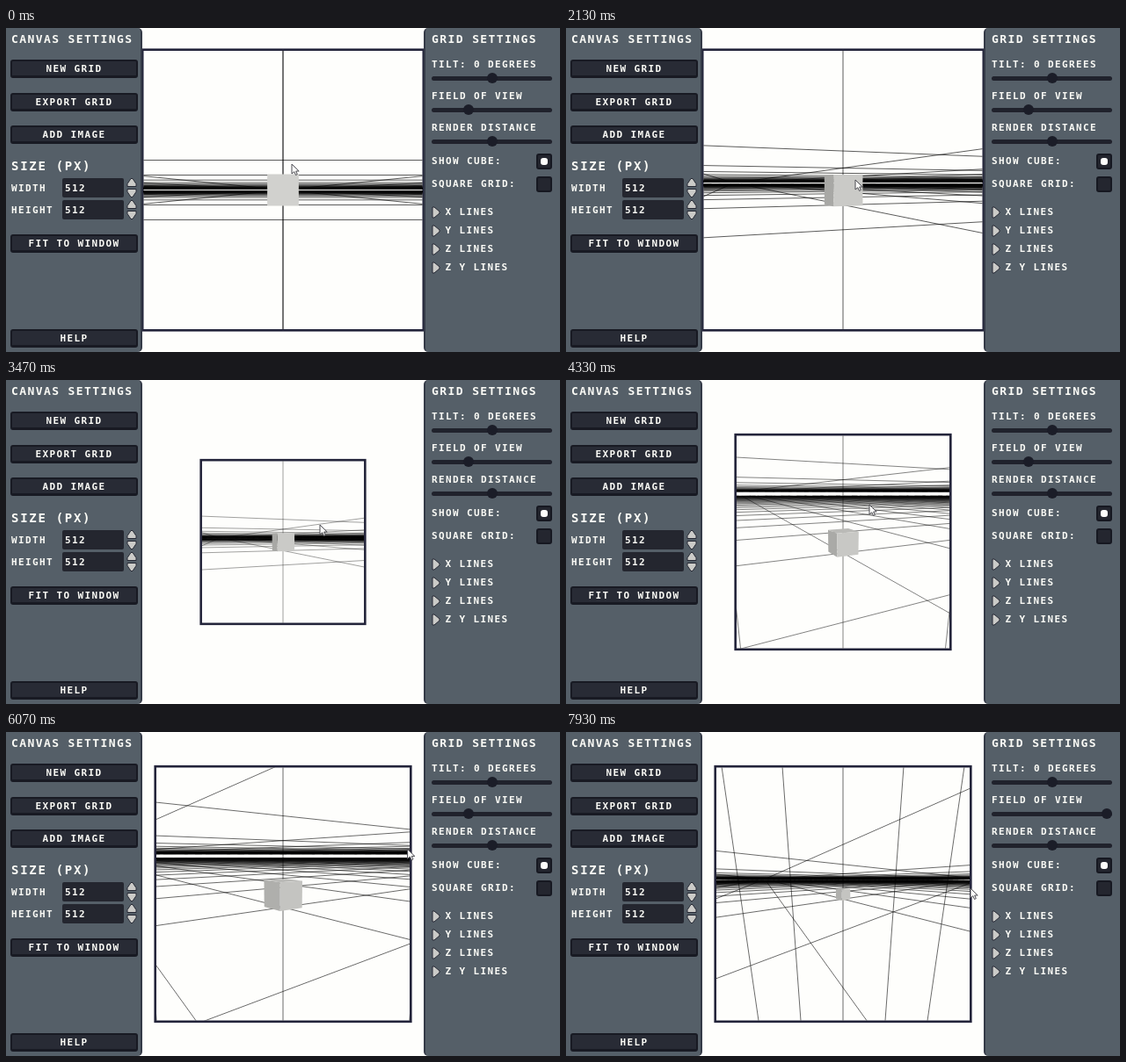
These frames come from a looping animation (630x369 px, 8000 ms). An HTML page with a canvas:

```html
<!DOCTYPE html>
<html lang="en">
<head>
<meta charset="utf-8">
<title>Grid settings</title>
<style>
  html, body { margin: 0; width: 100%; height: 100%; overflow: hidden; background: #fefefc; }
  #stage { position: relative; width: 630px; height: 369px; overflow: hidden; }
  #stage * { position: absolute; box-sizing: border-box; }
  .panel { top: 0; width: 155px; height: 369px; background: #555f68; border: 0 solid #343a47; }
  .left { left: 0; border-right-width: 2px; border-radius: 0 5px 5px 0; }
  .right { left: 475px; border-left-width: 2px; border-radius: 5px 0 0 5px; }
  .text { font: bold 11px/20px "DejaVu Sans Mono", monospace; letter-spacing: 1.38px; color: #fbfbf6; white-space: pre; }
  .head { font-size: 13px; letter-spacing: 1.4px; }
  .title { font-size: 14px; letter-spacing: 1.7px; }
  .button { left: 5px; width: 145px; height: 21px; background: #282b35; border: solid #181a23; border-width: 2px 2px 3px;
            border-radius: 3px; line-height: 17px; text-align: center; }
  .field { left: 64px; width: 70px; height: 22px; background: #24262f; border-radius: 2px; padding-left: 3px; line-height: 23px; }
  .track { left: 484px; width: 137px; height: 5px; background: #20222c; border-radius: 3px; }
  .thumb { width: 12px; height: 12px; margin: -6px; background: #1b1d28; border-radius: 50%; }
  .box { left: 603px; width: 18px; height: 18px; background: #24262f; border: 2px solid #161821; border-radius: 3px; }
  .dot { left: 608px; width: 8px; height: 8px; background: #fefefc; border-radius: 3px; }
  svg { left: 0; top: 0; }
</style>
</head>
<body>
<div id="stage">
  <canvas id="view" width="630" height="369"></canvas>
  <div class="panel left"></div>
  <div class="panel right"></div>
</div>
<script>
const stage = document.getElementById('stage');
const ctx = document.getElementById('view').getContext('2d');

function add(className, x, y, text = '') {
  const el = document.createElement('div');
  el.className = className;
  if (x !== null) el.style.left = x + 'px';
  el.style.top = y + 'px';
  el.textContent = text;
  stage.append(el);
  return el;
}
const label = (text, x, middle, kind = '') => add('text ' + kind, x, middle - 10, text);

label('CANVAS SETTINGS', 6, 13, 'head');
label('SIZE (PX)', 6, 157, 'title');
label('GRID SETTINGS', 484, 13, 'head');
['NEW GRID', 'EXPORT GRID', 'ADD IMAGE'].forEach((text, i) => add('text button', null, 36 + 37.5 * i, text));
add('text button', null, 234.5, 'FIT TO WINDOW');
add('text button', null, 342.5, 'HELP');
['WIDTH', 'HEIGHT'].forEach((text, i) => {
  label(text, 6, 182.5 + 25 * i);
  add('text field', null, 171 + 25 * i, '512');
});
const SLIDER_X = 526;
const thumbs = [['TILT: 0 DEGREES', 552.5], ['FIELD OF VIEW', SLIDER_X], ['RENDER DISTANCE', 552.5]]
  .map(([text, x], i) => {
    const y = 57 + 36 * i;
    label(text, 484, y - 15);
    add('track', null, y - 2.5);
    return add('thumb', x, y);
  });
['SHOW CUBE:', 'SQUARE GRID:'].forEach((text, i) => {
  label(text, 484, 152 + 26 * i);
  add('box', null, 143 + 26 * i);
});
add('dot', null, 148);

const rows = ['X LINES', 'Y LINES', 'Z LINES', 'Z Y LINES'].map((text, i) => {
  label(text, 499.5, 210 + 21 * i);
  return `M485 ${204 + 21 * i}v12h2l6-5v-2l-6-5z`;
});
const spins = [171, 196].map(y => `M138 ${y + 9.5}v-3l4-6h2l4 6v3zM138 ${y + 12.5}v3l4 6h2l4-6v-3z`);
stage.insertAdjacentHTML('beforeend', `
  <svg width="630" height="369">
    <path d="${rows.join('') + spins.join('')}" fill="#cbcbc8" stroke="#262934" stroke-linejoin="round"/>
    <path id="cursor" d="M0 0V11L2.8 8.7L4.5 12.5L6.3 11.6L4.7 8H8.2Z" fill="#fefefc" stroke="#4a4a50"/>
  </svg>`);
const cursor = document.getElementById('cursor');

// Progress from 0 to 1 between two times, straight or eased.
const ramp = (t, from, to) => Math.min(1, Math.max(0, (t - from) / (to - from)));
const ease = (t, from, to) => { const k = ramp(t, from, to); return k * k * (3 - 2 * k); };
const mix = (a, b, k) => a + (b - a) * k;

const yawAt = t => 10 * ramp(t, 1133, 1733) + 10 * ramp(t, 2000, 2133) + 17 * ease(t, 3467, 5933);
const pitchAt = t => 1.35 * ramp(t, 1133, 2133) + 11 * ease(t, 3467, 4333) - 4.1 * ramp(t, 5200, 5933);
const sizeAt = t => 317 - 133 * ramp(t, 2600, 3467) + 104 * ease(t, 3467, 5075);
const focalAt = t => 1.072 + 0.073 * ramp(t, 6400, 6867) - 0.739 * ramp(t, 6867, 7533);
const sliderAt = t => SLIDER_X + 89 * ramp(t, 6400, 7533) ** 1.5;

// Pointer stops as arrival time and place; each trip takes at most 600 ms.
const stops = [[0, 325, 155], [1000, 277, 185], [1733, 357, 166], [1933, 307, 164], [2133, 329, 173],
  [2533, 357, 165], [4133, 345, 142], [5400, 395, 203], [5933, 360, 203], [6200, 553, 64],
  [6333, 526, 92], [7933, 371, 178]];

function cursorAt(t) {
  let [last, x, y] = stops[0];
  for (const [arrival, toX, toY] of stops.slice(1)) {
    const k = ramp(t, Math.max(last, arrival - 600), arrival);
    x = mix(x, toX, k);
    y = mix(y, toY, k);
    last = arrival;
  }
  return [x + sliderAt(t) - SLIDER_X, y]; // carried along by the dragged thumb
}

// Lengths are in units of the camera's distance from the cube.
const STEP = 0.5, COUNT = 40, HALF = 0.05, NEAR = 0.01, FAR = 16;
const CX = 315, CY = 184.5;

function drawView(yawDeg, pitchDeg, size, focal) {
  const yaw = yawDeg * Math.PI / 180, pitch = pitchDeg * Math.PI / 180;
  const cy = Math.cos(yaw), sy = Math.sin(yaw), cp = Math.cos(pitch), sp = Math.sin(pitch);
  const turn = (u, y, v) => [u * cy - v * sy, y, u * sy + v * cy];
  const toCamera = ([x, y, z]) => {
    const dy = y - sp, dz = z + cp;
    return [x, dy * cp + dz * sp, dz * cp - dy * sp];
  };
  const project = ([x, y, z]) => [CX + focal * x / z, CY - focal * y / z];

  function line(from, to) {
    const [a, b] = [toCamera(from), toCamera(to)].sort((p, q) => p[2] - q[2]);
    if (b[2] < NEAR || a[2] > FAR) return;
    const atDepth = z => a.map((v, i) => mix(v, b[i], (z - a[2]) / (b[2] - a[2])));
    ctx.moveTo(...project(a[2] < NEAR ? atDepth(NEAR) : a));
    ctx.lineTo(...project(b[2] > FAR ? atDepth(FAR) : b));
  }

  const left = CX - size / 2, top = CY - size / 2;
  ctx.clearRect(0, 0, 630, 369);
  ctx.fillStyle = '#23243a';
  ctx.fillRect(left - 2.6, top - 2.6, size + 5.2, size + 5.2);
  ctx.fillStyle = '#fefefc';
  ctx.fillRect(left, top, size, size);
  ctx.save();
  ctx.beginPath();
  ctx.rect(left, top, size, size);
  ctx.clip();

  // The lower plane stays under the cube, the upper one follows the camera.
  const reach = STEP * COUNT, planes = [-HALF, sp + HALF];
  const offsets = Array.from({ length: 2 * COUNT + 1 }, (_, i) => (i - COUNT) * STEP);
  ctx.strokeStyle = '#000';
  ctx.lineWidth = size / 490;
  ctx.beginPath();
  for (const y of planes)
    for (const s of offsets) line(turn(-reach, y, s), turn(reach, y, s));
  ctx.stroke();
  ctx.beginPath();
  for (const y of planes)
    for (const s of offsets) line(turn(s, y, -reach), turn(s, y, reach));
  for (let i = -2; i <= 2; i++) line([i * STEP, -9, 0], [i * STEP, 9, 0]);
  ctx.stroke();

  function face(shade, corners) {
    ctx.fillStyle = `rgb(${shade},${shade},${shade - 3})`;
    ctx.beginPath();
    corners.forEach(([u, y, v]) =>
      ctx.lineTo(...project(toCamera(turn(u * HALF, y * HALF, v * HALF)))));
    ctx.fill();
  }
  if (sp > HALF) face(186, [[-1, 1, -1], [1, 1, -1], [1, 1, 1], [-1, 1, 1]]);
  if (sy * cp > HALF) face(160 + yawDeg * 0.4, [[-1, -1, -1], [-1, 1, -1], [-1, 1, 1], [-1, -1, 1]]);
  face(209 - yawDeg * 0.35, [[-1, -1, -1], [1, -1, -1], [1, 1, -1], [-1, 1, -1]]);
  ctx.restore();
}

const LOOP = 8000, TICK = 1000 / 15;
const start = performance.now();

function render() {
  const elapsed = (performance.now() - start) % LOOP;
  const t = Math.floor((elapsed + 4) / TICK) * TICK;
  const size = sizeAt(t);
  drawView(yawAt(t), pitchAt(t), size, focalAt(t) * size);
  thumbs[1].style.left = sliderAt(t) + 'px';
  cursor.setAttribute('transform', `translate(${cursorAt(t).join(' ')})`);
  requestAnimationFrame(render);
}
render();
</script>
</body>
</html>
```
